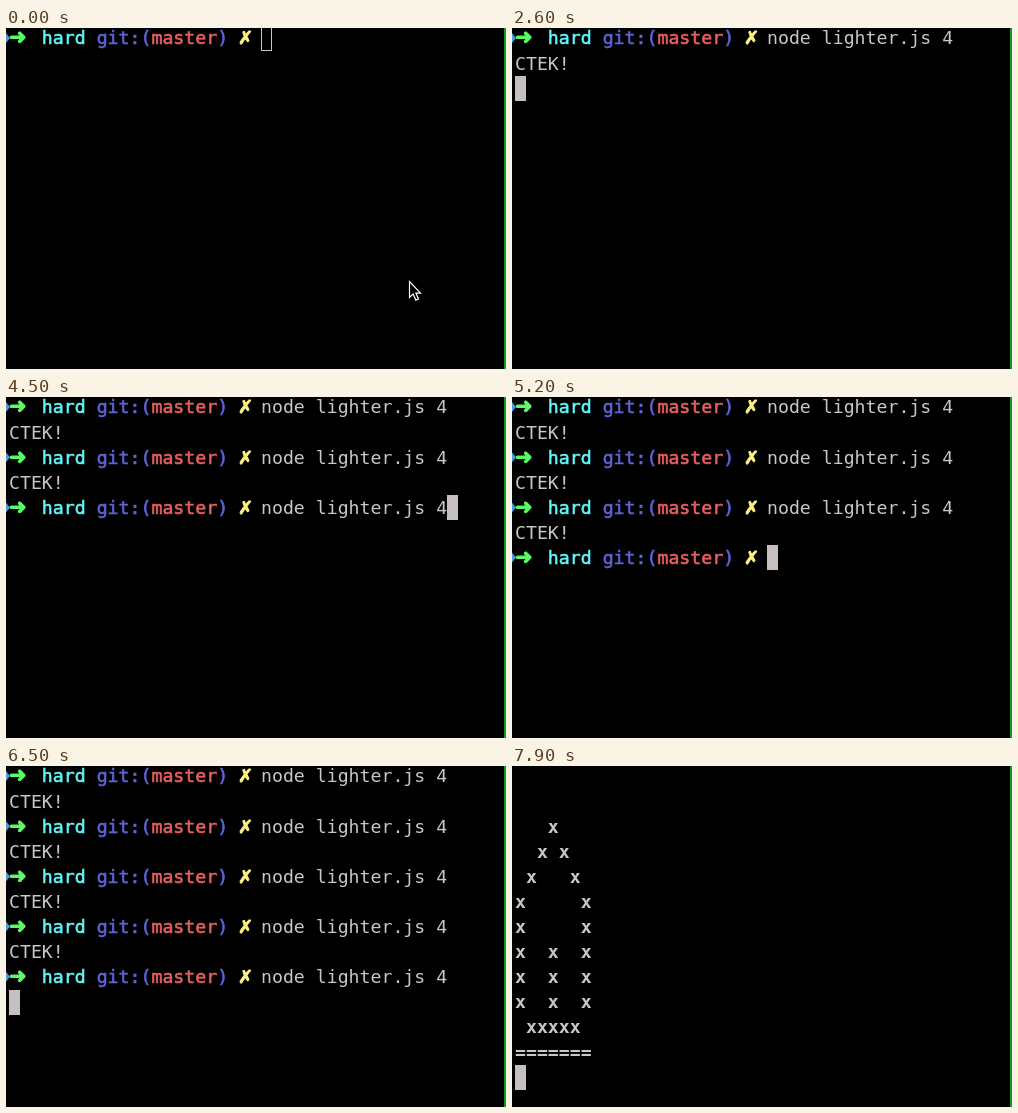
An HTML page that plays this animation: 500 by 341 pixels, repeating every 8 s.

```html
<!DOCTYPE html>
<html lang="en">
<head>
<meta charset="utf-8">
<title>Terminal lighter</title>
<style>
  html, body { margin: 0; width: 100%; height: 100%; overflow: hidden; background: #000; }
  svg { display: block; width: 500px; height: 341px; }
  text { font: 18.2px "DejaVu Sans Mono", monospace; fill: currentColor; white-space: pre; }
  .strong { stroke: currentColor; stroke-width: .6px; }
  .bold { font-weight: bold; }
  .symbol { font: bold 21px "DejaVu Sans", sans-serif; stroke: currentColor; stroke-width: 1px; }
  .cross { font-size: 18px; }
</style>
</head>
<body>
<svg viewBox="0 0 500 341">
  <rect width="500" height="341"/>
  <g id="screen"></g>
  <path id="pointer" d="M403.5 253.5v16l3.7-3.4 2.6 6 2.7-1.2-2.6-5.8h4.6z" fill="#000" stroke="#fff" stroke-width="1.2"/>
  <rect x="498" width="2" height="341" fill="#1a961a"/>
</svg>
<script>
  const LOOP = 8000, CELL = 10.957, LINE = 25.1;
  const COMMAND = 'node lighter.js 4', PROMPT_COLS = 23;
  const screen = document.getElementById('screen');
  const pointer = document.getElementById('pointer');

  const colX = col => 3 + col * CELL;
  const baseline = row => 16.4 + row * LINE;
  const text = (row, col, value, color = '#c7c7c7', cls = '') =>
    `<text x="${colX(col)}" y="${baseline(row)}" class="${cls}" style="color:${color}">${value}</text>`;

  function prompt(row, typed = '') {
    const y = 10 + row * LINE;
    return `<path d="M0 ${y - 5}L4 ${y}L0 ${y + 5}z" fill="#4f97d8"/>` +
      text(row, 0, '➜', '#5ffa68', 'symbol') +
      text(row, 3, 'hard', '#60f5f7', 'strong') +
      text(row, 8, 'git:(', '#5f63d8', 'strong') +
      text(row, 13, 'master', '#e85f5f', 'strong') +
      text(row, 19, ')', '#5f63d8', 'strong') +
      text(row, 20.9, '✗', '#fff480', 'symbol cross') +
      text(row, PROMPT_COLS, typed);
  }

  function cursor(row, col, hollow = false) {
    const top = Math.max(0, Math.round(row * LINE - 2.2));
    const height = row ? 25 : 23;
    const x = Math.round(colX(col));
    return hollow
      ? `<rect x="${x + .5}" y="-2.5" width="10" height="25" fill="none" stroke="#c7c7c7"/>`
      : `<rect x="${x}" y="${top}" width="11" height="${height}" fill="#c6bfc2"/>`;
  }

  const promptLine = (row, typed = '') =>
    prompt(row, typed) + cursor(row, PROMPT_COLS + typed.length);

  const history = runs => Array.from({ length: runs }, (_, i) =>
    prompt(i * 2, COMMAND) + text(i * 2 + 1, 0, 'CTEK!')).join('');

  function lighter(flame) {
    const lines = [
      ...Array(4 - flame).fill(''),
      '   x', '  x x', ' x   x',
      ...Array(flame).fill('x     x'),
      ...Array(3).fill('x  x  x'),
      ' xxxxx', '======='
    ];
    return lines.map((line, row) => text(row, 0, line, '#c7c7c7', 'bold')).join('') + cursor(12, 0);
  }

  const steps = [
    [0, prompt(0) + cursor(0, PROMPT_COLS, true)],
    [400, promptLine(0)]
  ];
  [...'clear'].forEach((_, i) => steps.push([600 + i * 100, promptLine(0, 'clear'.slice(0, i + 1))]));
  steps.push([1300, cursor(0, 0)], [1700, promptLine(0)]);

  // Each failed strike: recalled command, return, output, next prompt.
  [[2000, 2300, 2500, 2700], [3500, 3800, 4000, 4100], [4400, 4600, 4800, 4900], [5300, 5500, 5700, 5800]]
    .forEach(([recall, enter, output, done], run) => {
      const row = run * 2, past = history(run), next = history(run + 1);
      steps.push(
        [recall, past + promptLine(row, COMMAND)],
        [enter, past + prompt(row, COMMAND) + cursor(row + 1, 0)],
        [output, next + cursor(row + 2, 0)],
        [done, next + promptLine(row + 2)]
      );
    });

  steps.push(
    [6200, history(4) + promptLine(8, COMMAND)],
    [6400, history(4) + prompt(8, COMMAND) + cursor(9, 0)]
  );
  [2, 3, 4, 3, 2].forEach((flame, i) => steps.push([6700 + i * 300, lighter(flame)]));

  let shown = -1;
  const start = performance.now();
  function draw(now) {
    const t = Math.max(0, now - start) % LOOP;
    const index = steps.findLastIndex(([at]) => at <= t);
    if (index !== shown) {
      shown = index;
      screen.innerHTML = steps[index][1];
      pointer.style.display = t < 600 ? '' : 'none';
    }
    requestAnimationFrame(draw);
  }
  draw(start);
</script>
</body>
</html>
```
